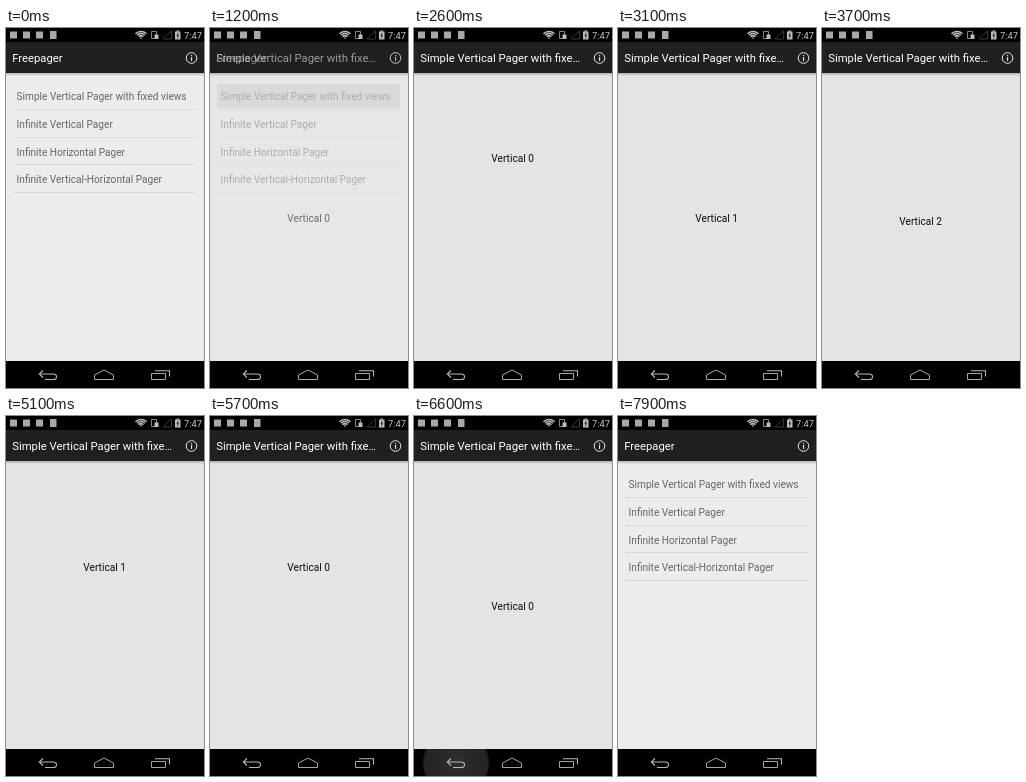
An HTML page with a canvas that plays this animation: 198 by 360 pixels, repeating every 8.1 s.

```html
<!DOCTYPE html>
<html lang="en">
<head>
<meta charset="utf-8">
<title>Vertical pager demo</title>
<style>
  html, body { margin: 0; width: 100%; height: 100%; overflow: hidden; background: #000; }
  canvas { display: block; width: 198px; height: 360px; }
</style>
</head>
<body>
<canvas id="stage"></canvas>
<script>
const W = 198, H = 360, LOOP = 8100, STEP = 100;
const TOP = 45, BOTTOM = 333, PAGE = 286;
const FONT = 'Roboto, "Noto Sans", sans-serif';
const ITEMS = [
  'Simple Vertical Pager with fixed views',
  'Infinite Vertical Pager',
  'Infinite Horizontal Pager',
  'Infinite Vertical-Horizontal Pager'
];

const canvas = document.getElementById('stage');
const ctx = canvas.getContext('2d');
const dpr = window.devicePixelRatio || 1;
canvas.width = W * dpr;
canvas.height = H * dpr;
ctx.scale(dpr, dpr);

const clamp = v => Math.max(0, Math.min(1, v));

// Slow finger drag, quick release, soft landing; in pages.
function swipe(t, start, grab = 0) {
  if (t <= start) return 0;
  const p = clamp((t - start) / 600);
  return grab + (1 - grab) * (1 - (1 - p ** 2.4) ** 4.2);
}

// Overscroll past the last page that swings back and dies out; in px.
function bounce(t, start, size) {
  const p = clamp((t - start) / 700);
  return size * Math.sin(p * Math.PI * 7 / 3) * (1 - p);
}

function scrollAt(t) {
  const pages = swipe(t, 2500, 0.16) + swipe(t, 3200) - swipe(t, 4700) - swipe(t, 5300);
  return pages * PAGE + bounce(t, 3900, 98) - bounce(t, 5900, 116);
}

function rect(x, y, w, h, color) {
  ctx.fillStyle = color;
  ctx.fillRect(x, y, w, h);
}

function text(str, x, y, size, color, align = 'left') {
  ctx.font = `${size}px ${FONT}`;
  ctx.textAlign = align;
  ctx.fillStyle = color;
  ctx.fillText(str, x, y);
}

function line(points, color, width = 1, close = false) {
  ctx.beginPath();
  points.forEach(([x, y]) => ctx.lineTo(x, y));
  if (close) ctx.closePath();
  ctx.strokeStyle = color;
  ctx.lineWidth = width;
  ctx.stroke();
}

function arc(x, y, r, from, to, color, width) {
  ctx.beginPath();
  ctx.arc(x, y, r, from, to);
  ctx.strokeStyle = color;
  ctx.lineWidth = width;
  ctx.stroke();
}

function statusBar() {
  const c = '#bdbdbd';
  rect(0, 0, W, 14, '#000');
  for (let i = 0; i < 3; i++) rect(4 + i * 13, 3.5, 7, 7, '#a8a8a8');
  rect(44, 3, 6.5, 8, '#a8a8a8');

  // wifi
  for (let r = 1; r < 8; r += 2.2) {
    arc(135, 11, r, -Math.PI * 0.76, -Math.PI * 0.24, c, 1.5);
  }
  // phone with badge
  line([[145.5, 3.5], [150.5, 3.5], [150.5, 10.5], [145.5, 10.5]], '#888', 1, true);
  rect(148.5, 6.5, 4, 4.5, c);
  // empty signal
  line([[157, 11], [165.5, 11], [165.5, 2.8]], '#444', 0.8, true);
  // battery
  rect(170.5, 2.5, 2.5, 1.2, c);
  rect(169, 3.5, 5.5, 8, c);
  line([[172.4, 4.8], [170.9, 7.4], [172.7, 7.4], [171.2, 10.2]], '#222', 0.9);
  text('7:47', 196, 11, 9.3, '#c8c8c8', 'right');
}

function actionBar(title) {
  rect(0, 14, W, TOP - 14, '#202020');
  text(title, 6.2, 34.2, 11.3, '#fff');
  arc(185.5, 30, 5.3, 0, Math.PI * 2, '#e4e4e4', 1);
  rect(185, 27, 1.1, 1.2, '#e4e4e4');
  rect(185, 29, 1.1, 4, '#e4e4e4');
}

function barShadow() {
  const g = ctx.createLinearGradient(0, TOP, 0, TOP + 3);
  g.addColorStop(0, 'rgba(90,60,75,.35)');
  g.addColorStop(1, 'rgba(90,60,75,0)');
  rect(0, TOP, W, 3, g);
}

function listScreen(pressed) {
  rect(0, TOP, W, BOTTOM - TOP, '#ececec');
  if (pressed) rect(7, 56, 183, 24, '#cfcfcf');
  ITEMS.forEach((label, i) => {
    text(label, 10.6, 72.3 + i * 27.6, 10.12, '#666');
    rect(7, Math.round(81 + i * 27.6), 183, 1, '#dadada');
  });
  barShadow();
  actionBar('Freepager');
}

function pagerScreen(scroll) {
  rect(0, TOP, W, BOTTOM - TOP, '#e4e4e4');
  ctx.save();
  ctx.beginPath();
  ctx.rect(0, TOP, W, BOTTOM - TOP);
  ctx.clip();
  for (let i = 0; i < 3; i++) {
    text('Vertical ' + i, 98.6, 193.6 + i * PAGE - scroll, 10.12, '#0c0c0c', 'center');
  }
  ctx.restore();
  barShadow();
  actionBar('Simple Vertical Pager with fixe…');
}

function navBar(glow) {
  const c = '#b8b8b8';
  rect(0, BOTTOM, W, H - BOTTOM, '#000');
  if (glow > 0) {
    const g = ctx.createRadialGradient(42, 347, 0, 42, 347, 34);
    g.addColorStop(0, 'rgba(255,255,255,.18)');
    g.addColorStop(0.93, 'rgba(255,255,255,.14)');
    g.addColorStop(1, 'rgba(255,255,255,0)');
    ctx.globalAlpha = glow;
    rect(8, BOTTOM, 68, H - BOTTOM, g);
    ctx.globalAlpha = 1;
  }
  // back
  ctx.beginPath();
  ctx.moveTo(34, 346);
  ctx.lineTo(47, 346);
  ctx.quadraticCurveTo(50.5, 346, 50.5, 348.7);
  ctx.quadraticCurveTo(50.5, 351.5, 47, 351.5);
  ctx.lineTo(39, 351.5);
  ctx.strokeStyle = c;
  ctx.lineWidth = 1.1;
  ctx.stroke();
  line([[37, 342.5], [33.3, 346], [37, 349.5]], c, 1.1);
  // home
  line([[88.5, 351.5], [88.5, 347], [98, 342], [107.5, 347], [107.5, 351.5]], c, 0.9, true);
  // recents
  line([[145.5, 345.5], [159.5, 345.5], [159.5, 351.5], [145.5, 351.5]], c, 0.9, true);
  line([[149, 342.7], [163.5, 342.7], [163.5, 348.5]], c, 1.1);
}

function draw(t) {
  const inPager = t >= 1200 && t < 7400;
  const fade = 1 - (1 - clamp((t - 1100) / 300)) ** 2;
  if (!inPager || fade < 1) listScreen(t >= 100 && t < 1400);
  if (inPager) {
    ctx.globalAlpha = fade;
    pagerScreen(scrollAt(t));
    ctx.globalAlpha = 1;
  }
  statusBar();
  navBar(t < 6600 ? 0 : clamp((7900 - t) / 400));
}

// The picture advances in steps of a tenth of a second.
function frame(now) {
  draw(Math.floor((now % LOOP) / STEP) * STEP);
  requestAnimationFrame(frame);
}

draw(0);
requestAnimationFrame(frame);
</script>
</body>
</html>
```
